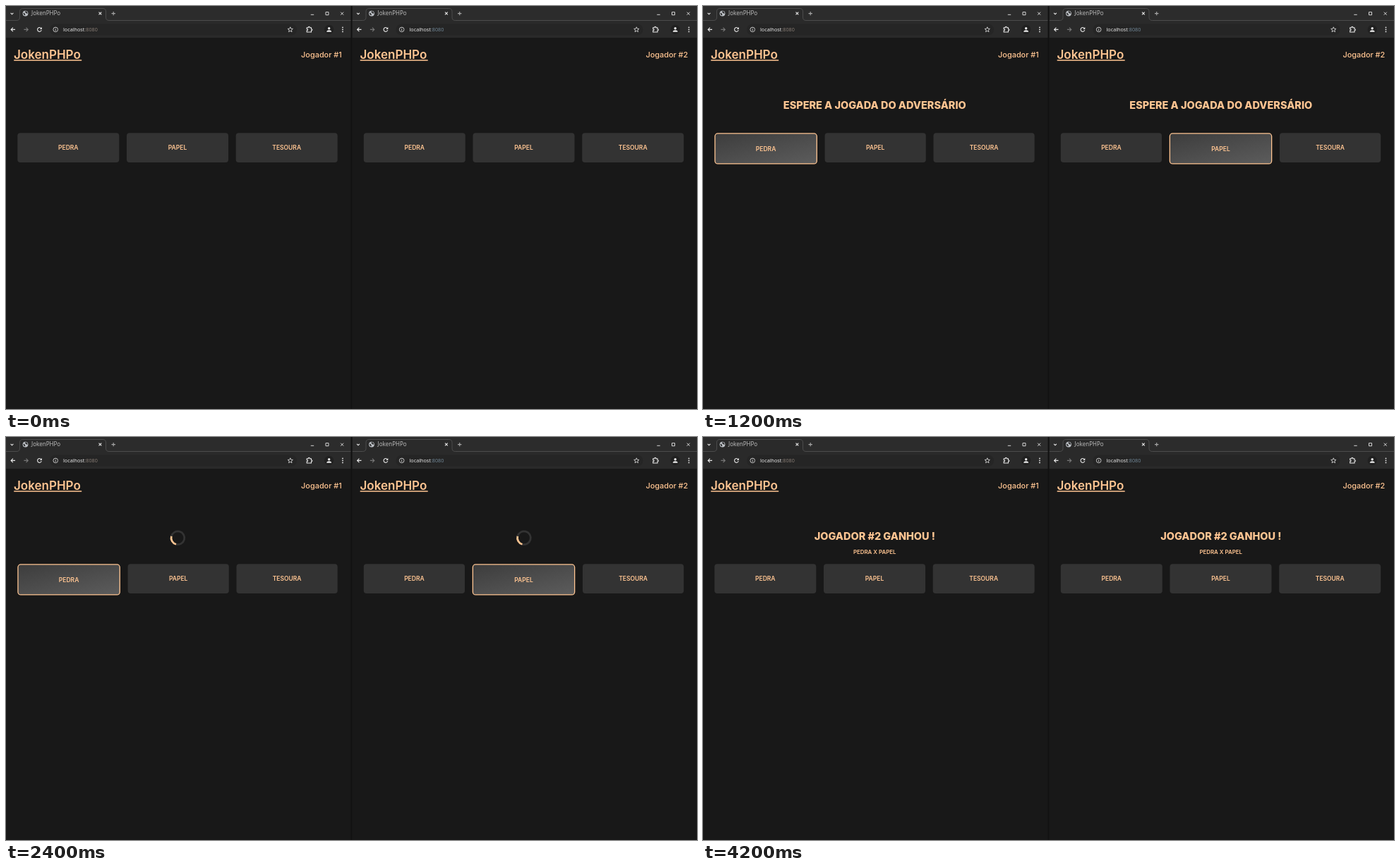
Write an HTML page that moves like this. It is 979 px wide and 572 px high and loops after 4600 ms.

```html
<!DOCTYPE html>
<html lang="pt-BR">
<head>
<meta charset="utf-8">
<title>JokenPHPo</title>
<style>
  html, body { margin: 0; width: 100%; height: 100%; overflow: hidden; background: #181818; }
  svg { display: block; width: 979px; height: 572px; }
  .page { font-family: Inter, Roboto, sans-serif; fill: #ffc592; }
  .page .mid { text-anchor: middle; }
  .chrome { font-family: "Noto Sans", "Open Sans", sans-serif; }
  .logo { font-size: 17px; font-weight: 600; }
  .player { font-size: 10.9px; font-weight: 500; text-anchor: end; }
  .big { font-size: 14.5px; font-weight: 800; }
  .small { font-size: 7.9px; font-weight: 600; }
  .label { font-size: 8.5px; font-weight: 600; }
  .icon { fill: none; stroke: #e8e8e8; stroke-width: 1.1; }
</style>
</head>
<body>
<svg id="stage" viewBox="0 0 979 572">
  <defs>
    <linearGradient id="picked" gradientUnits="objectBoundingBox" x1=".1" y1="0" x2=".9" y2="1">
      <stop offset="0" stop-color="#3e3e3e"/>
      <stop offset="1" stop-color="#5b5b5b"/>
    </linearGradient>
    <clipPath id="pane"><rect width="489" height="572"/></clipPath>
  </defs>
</svg>
<script>
const WAIT = "ESPERE A JOGADA DO ADVERSÁRIO";
const WIN = "JOGADOR #2 GANHOU !";
const LABELS = ["PEDRA", "PAPEL", "TESOURA"];
const LOOP = 4600;

// at: start in ms; pick: chosen button per player; text: heading per player; spin: degrees
const STEPS = [
  { at: 0,    pick: [-1, -1], text: ["", ""] },
  { at: 600,  pick: [0, -1],  text: [WAIT, ""] },
  { at: 1200, pick: [0, 1],   text: [WAIT, WAIT] },
  { at: 1800, pick: [0, 1],   text: ["", ""], spin: 70 },
  { at: 2400, pick: [0, 1],   text: ["", ""], spin: 240 },
  { at: 3000, pick: [0, 1],   text: ["", ""], spin: 17 },
  { at: 3600, pick: [-1, -1], text: [WIN, WIN], note: "PEDRA X PAPEL" }
];

const PORT = ["#857a72", "#6f8494"];
const stage = document.getElementById("stage");

function browser(i) {
  return `
  <g class="chrome">
    <rect width="489" height="45" fill="#2c2c2c"/>
    <path d="M0 20.5H15Q19.5 20.5 19.5 16V8Q19.5 3.5 24 3.5H137Q141.5 3.5 141.5 8V16Q141.5 20.5 146 20.5H489V45H0Z" fill="#2a2a2a"/>
    <path d="M0 20.5H15Q19.5 20.5 19.5 16V8Q19.5 3.5 24 3.5H137Q141.5 3.5 141.5 8V16Q141.5 20.5 146 20.5H489" fill="none" stroke="#555" stroke-width=".8"/>
    <path class="icon" d="M6.6 9.8L8.5 11.7L10.4 9.8"/>
    <circle cx="27.5" cy="10.6" r="3.9" fill="#bdc1c6"/>
    <path d="M24.4 9.6L26.6 10.6L27.4 12L26.6 13.6Q24.4 12.6 24.4 9.6ZM27.4 7.4H29.2Q30.8 8.8 30.6 10.8L28.8 10.6L28 9.2L26.6 9Z" fill="#2a2a2a"/>
    <text x="36" y="13.4" font-size="8" fill="#b9b9b9">JokenPHPo</text>
    <path class="icon" d="M131.5 8.6L135.3 12.4M135.3 8.6L131.5 12.4"/>
    <path class="icon" d="M149.5 10.6H154.9M152.2 7.9V13.3" stroke-width=".9" style="stroke:#a8a8a8"/>
    <path class="icon" d="M431.8 12.3H436.2M453 8.7H457V12.7H453ZM474.2 8.7L478.2 12.7M478.2 8.7L474.2 12.7" style="stroke-width:.9"/>
    <rect x="62" y="25.5" width="350" height="16" rx="8" fill="#252525"/>
    <path class="icon" d="M13 33.4H7.2M9.9 30.6L7.1 33.4L9.9 36.2"/>
    <path class="icon" d="M25.4 33.4H31.2M28.5 30.6L31.3 33.4L28.5 36.2" style="stroke:#777"/>
    <path class="icon" d="M49.9 31.8A2.9 2.9 0 1 0 50.3 34.2"/>
    <path d="M50.8 30V33H47.8Z" fill="#e8e8e8"/>
    <circle class="icon" cx="70.2" cy="33.4" r="3.3" style="stroke-width:.8"/>
    <path class="icon" d="M70.2 33V35.2M70.2 31.4V32.2" style="stroke-width:.9"/>
    <text x="81" y="36" font-size="7.2" fill="#e6e6e6">localhost<tspan fill="${PORT[i]}">:8080</tspan></text>
    <path class="icon" d="M402.8 29.8L403.8 32.2L406.4 32.4L404.4 34.1L405 36.7L402.8 35.3L400.6 36.7L401.2 34.1L399.2 32.4L401.8 32.2Z" style="stroke-width:.8"/>
    <path class="icon" d="M426.2 30.7H428.3Q428.2 29.3 429.3 29.3T430.3 30.7H432.5V32.8Q433.8 32.7 433.8 33.8T432.5 34.8V37H426.2V34.9Q427.6 34.9 427.6 33.8T426.2 32.7Z"/>
    <circle cx="457.7" cy="33.4" r="6.6" fill="#202020"/>
    <circle cx="457.7" cy="31.8" r="1.7" fill="#eee"/>
    <path d="M454.3 36.8V36Q454.6 34.2 457.7 34.2T461.1 36V36.8Z" fill="#eee"/>
    ${[30.4, 33.4, 36.4].map(y => `<circle cx="477" cy="${y}" r=".9" fill="#e8e8e8"/>`).join("")}
  </g>`;
}

function pane(i) {
  return `
  <g transform="translate(${i * 490.5} 0)" clip-path="url(#pane)">
    <rect width="489" height="572" fill="#181818"/>
    ${browser(i)}
    <g class="page">
      <text class="logo" x="11" y="75.4">JokenPHPo</text>
      <rect x="11.2" y="76.3" width="96" height="1.5"/>
      <text class="player" x="475.8" y="73">Jogador #${i + 1}</text>
      <g id="game${i}"></g>
    </g>
  </g>`;
}

function buttons(pick) {
  let x = 16.3;
  return LABELS.map((label, n) => {
    const on = n === pick;
    const w = pick < 0 ? 144 : on ? 145.6 : 143.2;
    const h = on ? 44.3 : 41.7;
    const b = on ? 0.65 : 0;
    const look = on ? 'fill="url(#picked)" stroke="#ffc592" stroke-width="1.3"' : 'fill="#333"';
    const out = `<rect x="${x + b}" y="${180.3 + b}" width="${w - 2 * b}" height="${h - 2 * b}" rx="4" ${look}/>
      <text class="label mid" x="${x + w / 2}" y="${183.4 + h / 2}">${label}</text>`;
    x += w + 10.7;
    return out;
  }).join("");
}

function spinner(deg) {
  const ring = 'r="9.4" fill="none" stroke-width="2.7"';
  return `<g transform="translate(243.4 143.2) rotate(${deg - 135})">
    <circle ${ring} stroke="#333"/>
    <circle ${ring} stroke="#ffc592" pathLength="4" stroke-dasharray="1 3"/>
  </g>`;
}

function draw(step) {
  for (const i of [0, 1]) {
    document.getElementById("game" + i).innerHTML =
      (step.spin === undefined ? "" : spinner(step.spin)) +
      `<text class="big mid" x="243.3" y="146.3">${step.text[i]}</text>` +
      `<text class="small mid" x="243.2" y="166.2">${step.note || ""}</text>` +
      buttons(step.pick[i]);
  }
}

stage.insertAdjacentHTML("beforeend",
  pane(0) + pane(1) + '<rect x="488.6" width="1.6" height="572" fill="#111"/>');

let shown;
function tick() {
  const t = performance.now() % LOOP;
  const step = STEPS.findLast(s => s.at <= t);
  if (step !== shown) draw(shown = step);
  requestAnimationFrame(tick);
}
tick();
</script>
</body>
</html>
```
